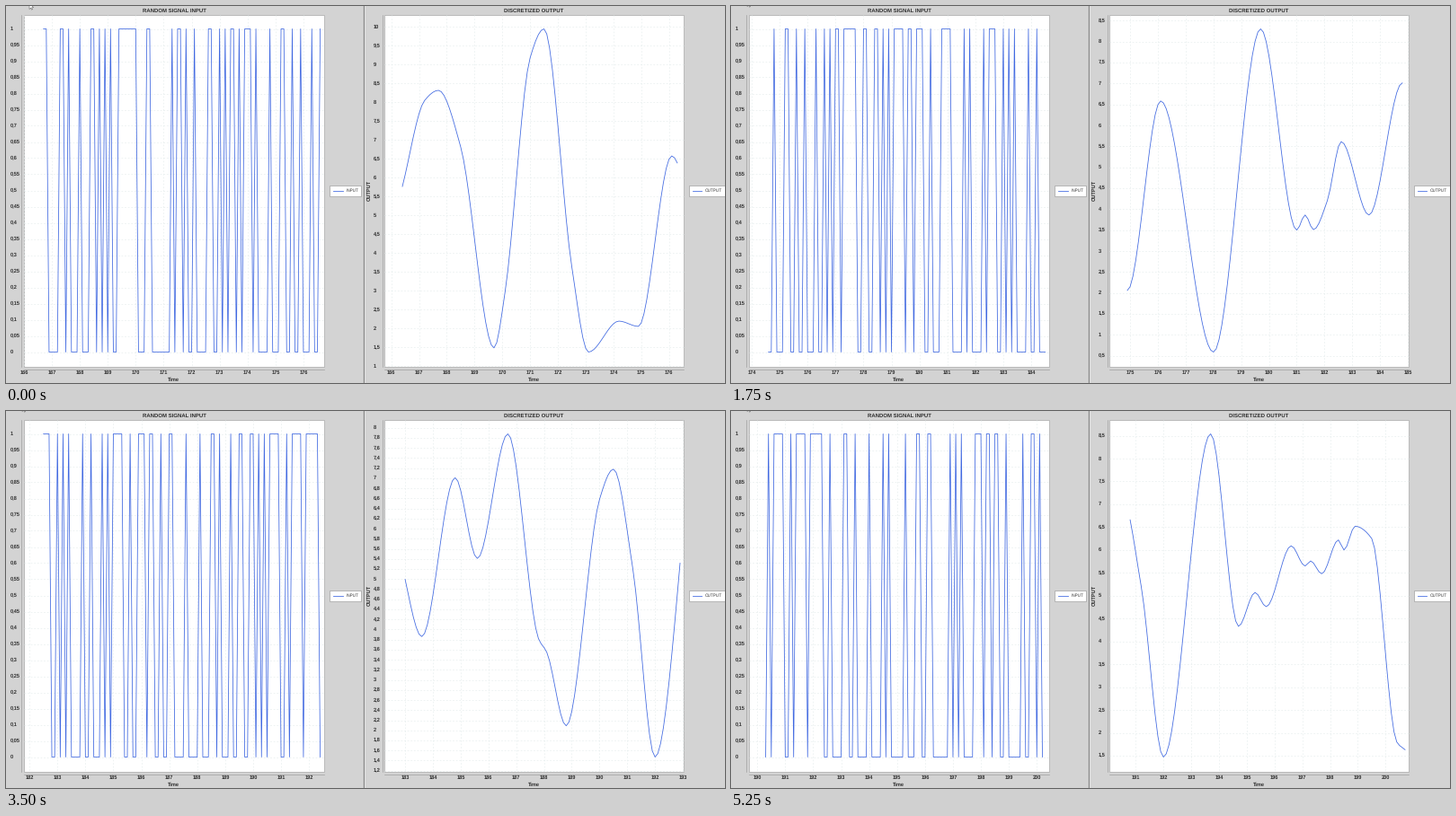
Animation, 800 px wide and 420 px high, one loop 5.5 s. Source, as a matplotlib script:

```python
import numpy as np
import matplotlib.pyplot as plt
from matplotlib.animation import FuncAnimation
from matplotlib.patches import Polygon, Rectangle

plt.rcParams["text.hinting"] = "none"
plt.rcParams["text.hinting_factor"] = 8

W, H, DPI = 800, 420, 100
PX = 72 / DPI
FRAMES, INTERVAL = 22, 250
SPAN = 100          # samples visible in each chart
BLUE, INK, AXIS = "#4169e1", "#303030", "#969696"
TOP, BOTTOM = 10, 402
Y_HIGH, Y_LOW = 25.5, 385.5

# Scroll keys: frame, input axis start, output axis start, output data start
SCROLL = np.array([
    (0, 166.7, 166.4, 166.4), (4, 171.1, 171.4, 171.4),
    (9, 176.9, 177.2, 177.2), (12, 180.7, 180.1, 180.4),
    (14, 182.5, 182.9, 183.0), (18, 187.6, 187.3, 187.3),
    (21, 190.4, 190.7, 190.8)])

# Peaks, valleys and shoulders of the output curve: (time, value)
KNOTS = np.array([
    (166.4, 5.77), (167.2, 8.05), (167.7, 8.32), (168.5, 6.82), (169.7, 1.49),
    (170.1, 2.98), (171.0, 9.18), (171.5, 9.95), (172.5, 3.65), (173.1, 1.38),
    (174.2, 2.20), (174.9, 2.06), (176.1, 6.58), (178.0, 0.59), (179.7, 8.30),
    (181.0, 3.50), (181.3, 3.86), (181.6, 3.51), (182.1, 4.20), (182.6, 5.61),
    (183.6, 3.86), (184.8, 7.01), (185.6, 5.41), (186.7, 7.88), (187.8, 3.82),
    (188.1, 3.55), (188.8, 2.09), (190.0, 6.58), (190.5, 7.18), (191.2, 5.20),
    (192.0, 1.47), (193.7, 8.54), (194.7, 4.33), (195.3, 5.07), (195.7, 4.76),
    (196.6, 6.09), (197.1, 5.65), (197.3, 5.76), (197.7, 5.48), (198.3, 6.22),
    (198.5, 6.00), (198.9, 6.52), (199.5, 6.25), (200.4, 1.80), (200.7, 1.63)])


def monotone_curve(points, t):
    """Hermite curve that is flat at peaks and valleys and never overshoots."""
    kt, kv = points.T
    h = np.diff(kt)
    d = np.diff(kv) / h
    slope = np.zeros(len(kt))
    same = d[:-1] * d[1:] > 0
    a, b = d[:-1][same], d[1:][same]
    slope[1:-1][same] = 2 * a * b / (a + b)
    slope[0], slope[-1] = d[0], d[-1]
    i = np.clip(np.searchsorted(kt, t, side="right") - 1, 0, len(h) - 1)
    u = (t - kt[i]) / h[i]
    rise = u * u * (3 - 2 * u)
    return (kv[i] + (kv[i + 1] - kv[i]) * rise
            + h[i] * u * (1 - u) * ((1 - u) * slope[i] - u * slope[i + 1]))


def random_signal(count):
    """Binary signal with mostly short, random high and low phases."""
    rng = np.random.default_rng(7)
    runs = rng.geometric([0.58, 0.5], size=(count, 2)).ravel()
    return np.repeat(np.tile([1, 0], count), runs)[:count]


in_t = 166.7 + np.arange(336) / 10
in_v = random_signal(len(in_t))
out_t = 166.4 + np.arange(344) / 10
out_v = monotone_curve(KNOTS, out_t)

fig = plt.figure(figsize=(W / DPI, H / DPI), dpi=DPI, facecolor="#d3d3d3")
ax = fig.add_axes([0, 0, 1, 1])


def line(xs, ys, color, width=0.8, **kw):
    return ax.plot(xs, ys, color=color, lw=width * PX, **kw)[0]


def label(x, y, text, size=5.6, weight="bold", ha="center", **kw):
    ax.text(x, y, text, fontsize=size * PX, family="Liberation Sans",
            weight=weight, color=INK, ha=ha, va="center", **kw)


def box(x0, y0, x1, y1, edge):
    patch = Rectangle((x0, y0), x1 - x0, y1 - y0, fc="white", ec=edge,
                      lw=0.7 * PX)
    ax.add_patch(patch)
    return patch


def number(value):
    return f"{round(value, 2):g}".replace(".", ",")


def chart(left, right, x0, scale, start, t, v, first, lo, hi, step, label_x):
    """Plot area, grid, tick labels and the visible part of one signal."""
    area = box(left, TOP, right, BOTTOM, "#a8a8a8")
    to_x = lambda s: x0 + (s - start) * scale
    to_y = lambda s: Y_LOW - (s - lo) * (Y_LOW - Y_HIGH) / (hi - lo)
    grid = dict(color="#e4ecec", width=0.6, dashes=(3, 3))
    line([left - 2.5] * 2, [TOP, BOTTOM], AXIS, 0.6)
    line([left, right], [BOTTOM + 2.5] * 2, AXIS, 0.6)

    for n in range(int(start) - 1, int(start) + 13):
        x = to_x(n)
        if left - 0.5 <= x <= right + 0.5:
            line([x, x], [TOP, BOTTOM], **grid)
            label(x, 408, str(n))
    for k in range(int(12 / step)):
        y = to_y(k * step)
        if TOP <= y <= BOTTOM:
            line([left, right], [y, y], **grid)
            label(label_x, y, number(k * step), ha="left")

    part = slice(first, first + SPAN)
    line(to_x(t[part]), to_y(v[part]), BLUE).set_clip_path(area)
    label((left + right) / 2, 416, "Time")


def legend(x0, x1, text):
    box(x0, 199.5, x1, 211.5, "#a0a0a0")
    line([x0 + 4, x0 + 14.5], [205.5, 205.5], BLUE)
    label(x0 + 18.5, 205.6, text, 4.6, "normal", "left")


def window_index(t, start):
    return int(np.clip(round((start - t[0]) * 10), 0, len(t) - SPAN))


def draw(frame):
    ax.clear()
    ax.set(xlim=(0, W), ylim=(H, 0))
    ax.axis("off")
    in_start, out_start, out_first = (
        round(np.interp(frame, SCROLL[:, 0], column), 1)
        for column in SCROLL.T[1:])

    chart(19.5, 353.5, 41.7, 31.1, in_start, in_t, in_v,
          window_index(in_t, in_start), 0, 1, 0.05, 4.3)

    # The vertical range follows the data two samples late
    seen = window_index(out_t, out_start - 0.2)
    lo, hi = out_v[seen:seen + SPAN].min(), out_v[seen:seen + SPAN].max()
    step = 0.2 if 0.2 * (Y_LOW - Y_HIGH) / (hi - lo) > 10.7 else 0.5
    chart(421, 753.5, 441, 30.9, out_start, out_t, out_v,
          window_index(out_t, out_first), lo, hi, step, 409)

    label(187, 5.4, "RANDOM SIGNAL INPUT", 6)
    label(587.5, 5.4, "DISCRETIZED OUTPUT", 6)
    label(-1.2, 205, "INPUT", rotation=90)
    label(404, 205, "OUTPUT", rotation=90)
    legend(360, 394.5, "INPUT")
    legend(759.5, 799.5, "OUTPUT")

    line([397.5, 397.5], [0, H], "#858585", 1.3)
    line([399, 399], [0, H], "#e8e8e8")

    # Mouse pointer sliding out over the top edge
    slide = np.exp(-2 * frame)
    arrow = np.array([(0, 0), (0, 6.5), (1.6, 5.2), (2.6, 7.2), (3.5, 6.7),
                      (2.6, 4.8), (4.6, 4.6)])
    ax.add_patch(Polygon(arrow + (18 + 8 * slide, -6 + 3 * slide),
                         fc="white", ec="#555555", lw=0.5 * PX))


anim = FuncAnimation(fig, draw, frames=FRAMES, interval=INTERVAL,
                     init_func=lambda: None, repeat=True, repeat_delay=0)
plt.show()
```
